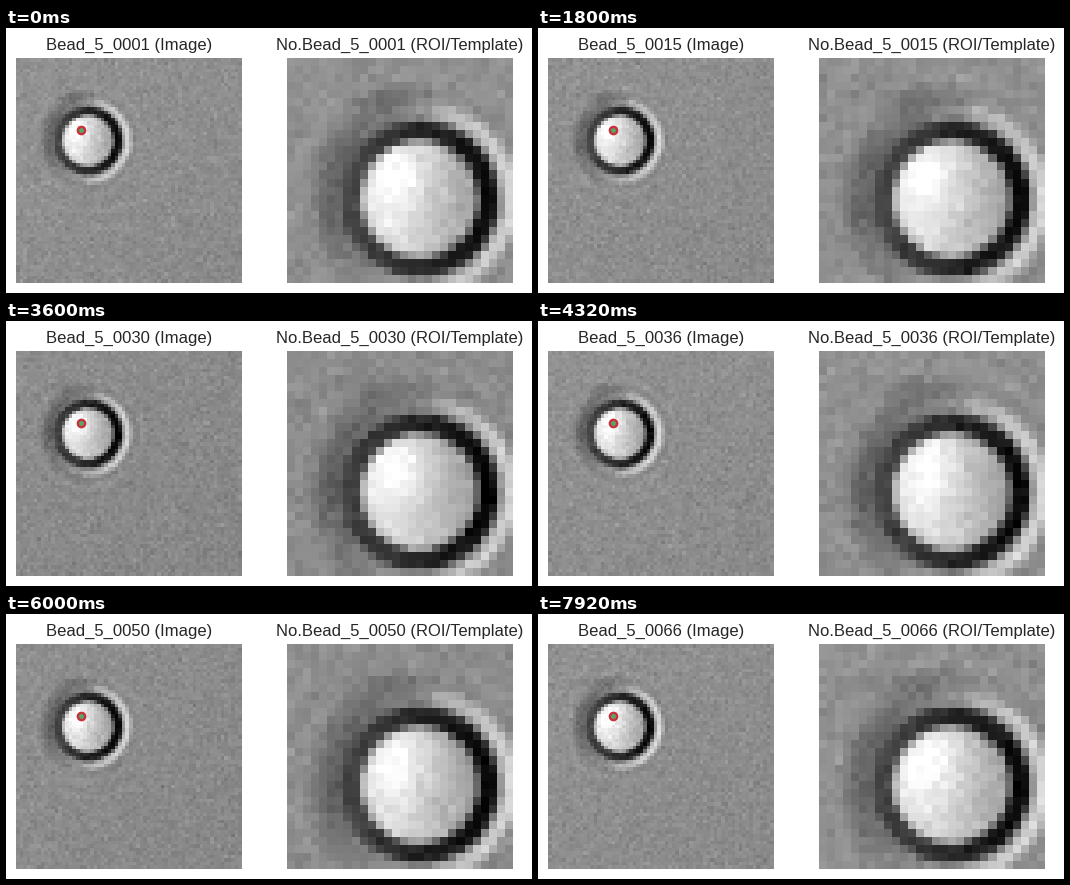
Write a matplotlib script that moves like this. It is 526x265 px and loops after 8000 ms.

```python
import numpy as np
import matplotlib.pyplot as plt
from matplotlib.animation import FuncAnimation

W, H, DPI = 526, 265, 100
SIZE = 64               # camera image, in cells
ROI = 28                # cropped square, in cells
MARK_X, MARK_Y = 18, 20
STEP_MS, TICK_MS, LOOP_MS = 120, 40, 8000

plt.rcParams["font.family"] = "Liberation Sans"
INK = "#262626"

yy, xx = np.mgrid[0:SIZE, 0:SIZE].astype(float)
dx, dy = xx - 19.9, yy - 23.05
r = np.hypot(dx, dy)
cos, sin = dx / r, dy / r


def bump(x, centre, width, power=2):
    return np.exp(-np.abs((x - centre) / width) ** power)


def bead():
    """Noise-free picture of the bead with its diffraction rings."""
    img = 146 - 0.07 * xx - 0.07 * yy
    ripple = 13 * np.cos((r - 11) * 2 * np.pi / 4.5) * np.exp(-(r - 11) / 4)
    img += np.where(r > 10, ripple, 0)
    img -= 22 * bump(dx, -5, 4.5) * bump(dy, -12.7, 1.5)
    img -= 58 * bump(r, 10.9, 1.6) * np.clip(-cos - 0.25 * sin, 0, 1)
    img += 62 * bump(r, 11.3, 1.0) * np.sqrt(np.clip(cos + 0.15 * sin, 0, 1))

    glow = bump(dx, -2.5, 4) * bump(dy, -3, 4.2)
    core = np.minimum(226, 206 - 6.5 * dx) + 36 * glow
    inside = 1 / (1 + np.exp((r - 7.3) / 0.35))
    img = img * (1 - inside) + core * inside

    ring = bump(r, 8.5, 1.3, 4)
    dark = 38 - 30 * cos
    return img * (1 - ring) + dark * ring


CLEAN = bead()


def picture(n):
    rng = np.random.default_rng(500 + n)
    noise = rng.normal(0, 6, CLEAN.shape)
    return np.clip(CLEAN + noise + rng.normal(0, 1.5), 0, 255)


def crop(img):
    top, left = MARK_Y - ROI // 2, MARK_X - ROI // 2
    return img[top:top + ROI, left:left + ROI]


def panel(left, img):
    ax = fig.add_axes([left / W, 10 / H, 226 / W, 225 / H])
    view = ax.imshow(img, cmap="gray", vmin=0, vmax=255,
                     interpolation="nearest", aspect="auto")
    ax.axis("off")
    return ax, view, ax.set_title("", fontsize=12, color=INK)


fig = plt.figure(figsize=(W / DPI, H / DPI), dpi=DPI, facecolor="white")
first = picture(1)
ax, full_view, full_title = panel(10, first)
_, roi_view, roi_title = panel(281, crop(first))
ax.plot(MARK_X, MARK_Y, "o", ms=6, mew=1, color="#c8323c")
ax.plot(MARK_X, MARK_Y, "o", ms=3.5, mew=0, color="#55a868")


def update(tick):
    n = max(1, tick * TICK_MS // STEP_MS)
    img = picture(n)
    full_view.set_data(img)
    roi_view.set_data(crop(img))
    full_title.set_text(f"Bead_5_{n:04d} (Image)")
    roi_title.set_text(f"No.Bead_5_{n:04d} (ROI/Template)")
    return full_view, roi_view, full_title, roi_title


anim = FuncAnimation(fig, update, frames=LOOP_MS // TICK_MS,
                     interval=TICK_MS, repeat=True, repeat_delay=0)
plt.show()
```
